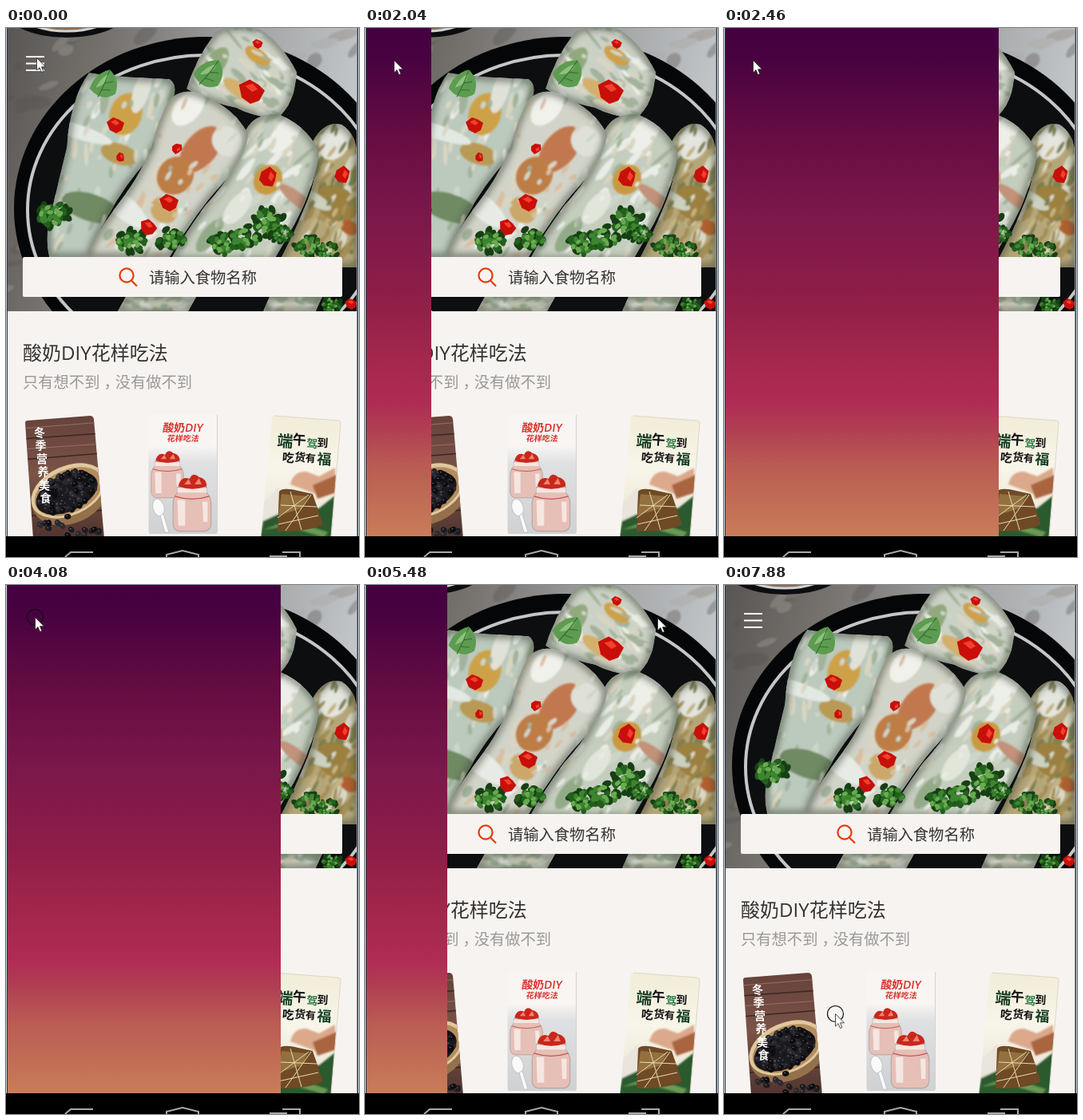
Recreate the animation shown at these times as an HTML page. Size 442 px wide and 663 px high, loop 8 s.

```html
<!DOCTYPE html>
<html lang="zh">
<head>
<meta charset="utf-8">
<style>
html, body { margin: 0; width: 100%; height: 100%; overflow: hidden; background: #f7f3f0; }
svg { display: block; font-family: "Open Sans", "Noto Sans CJK SC", "Noto Sans CJK", sans-serif; }
.brush { font-weight: 600; text-anchor: middle; }
</style>
</head>
<body>
<svg id="stage" width="442" height="663" viewBox="0 0 442 663">
  <defs>
    <linearGradient id="stone" x2="1" y2=".2">
      <stop offset="0" stop-color="#595552"/><stop offset=".3" stop-color="#77736f"/>
      <stop offset=".6" stop-color="#9a9b9c"/><stop offset="1" stop-color="#c3c7ca"/>
    </linearGradient>
    <linearGradient id="dusk" x2="0" y2="1">
      <stop offset="0" stop-color="#450041"/><stop offset=".06" stop-color="#480240"/>
      <stop offset=".2" stop-color="#640c42"/><stop offset=".36" stop-color="#7b174a"/>
      <stop offset=".53" stop-color="#8f1e48"/><stop offset=".64" stop-color="#a2264b"/>
      <stop offset=".74" stop-color="#b02c54"/><stop offset=".79" stop-color="#b03f52"/>
      <stop offset=".86" stop-color="#ba5b53"/><stop offset="1" stop-color="#c87d59"/>
    </linearGradient>
    <linearGradient id="wood" x2="0" y2="1">
      <stop offset="0" stop-color="#64413a"/><stop offset=".5" stop-color="#7b5347"/><stop offset="1" stop-color="#50342e"/>
    </linearGradient>
    <linearGradient id="mist" x2="0" y2="1">
      <stop offset=".27" stop-color="#f8f5f3"/><stop offset=".42" stop-color="#dfe0e1"/><stop offset="1" stop-color="#cfd1d3"/>
    </linearGradient>
    <linearGradient id="cream" x2="0" y2="1">
      <stop offset="0" stop-color="#f1ecd6"/><stop offset=".45" stop-color="#f8f5ea"/><stop offset="1" stop-color="#e6dfcb"/>
    </linearGradient>
    <filter id="soft"><feGaussianBlur stdDeviation="1.3"/></filter>
    <filter id="shade"><feGaussianBlur stdDeviation="4"/></filter>
    <clipPath id="photo"><path d="M2 0H439V355H2Z"/></clipPath>
    <clipPath id="card1"><path d="M24 495Q24 492 27 492L105 486Q109 486 110 490L123 640H34Z"/></clipPath>
    <clipPath id="card3"><path d="M333 489Q333 486 336 486L416 492Q420 493 419 496L407 640H319Z"/></clipPath>
    <g id="mint">
      <path fill="#5d9c50" d="M-15 6Q-12-12 4-19Q18-10 15 7Q2 20-15 6Z"/>
      <path fill="#8fc07f" d="M-8 4Q-4-9 4-14Q5-2-8 4Z"/>
      <path fill="none" stroke="#35702f" d="M4-18Q2-4-4 14M1-3 10-6M-1 5 9 4"/>
    </g>
    <g id="chili">
      <path fill="#c80f0a" d="M-11-4-3-10 5-7 11-3 8 6 1 10-7 6Z"/>
      <path fill="#f2402c" d="M-6-4 0-7 5-3 1 0Z"/>
    </g>
    <g id="jar">
      <path fill="#e6bfb6" stroke="#b3a6a2" d="M-17-24H17V-18Q23-12 22-2V17Q21 23 15 24H-15Q-21 23-22 17V-2Q-23-12-17-18Z"/>
      <path fill="#f5e6e1" d="M-17-10H-8V18H-16ZM12-8H18V14H13ZM-17-23H17V-18H-17Z"/>
      <path fill="none" stroke="#c5534f" d="M-20-14Q0-8 20-14"/>
      <path fill="#c9271c" d="M-16-25Q-13-37-3-33Q1-41 8-35Q17-33 17-25Q0-19-16-25Z"/>
      <path fill="#f0836f" d="M-9-27-4-33-1-27ZM3-27 8-34 11-27Z"/>
    </g>
  </defs>

  <g id="hero" clip-path="url(#photo)">
    <path fill="url(#stone)" d="M0 0H442V355H0Z"/>
    <g id="speckle" filter="url(#soft)" opacity=".35"></g>
    <ellipse cx="76" cy="-28" rx="82" ry="40" fill="#0d0d10"/>
    <ellipse cx="76" cy="-30" rx="68" ry="34" fill="#8d6a4e" stroke="#cfd2d2" stroke-width="3"/>
    <ellipse cx="250" cy="226" rx="240" ry="215" fill="#050608"/>
    <ellipse cx="250" cy="228" rx="223" ry="194" fill="#0d0e10" stroke="#c4c7c6" stroke-width="4"/>
    <g id="rolls"></g>
    <g id="garnish"></g>
  </g>

  <rect x="21" y="287" width="400" height="50" rx="2" fill="#f7f3f0"/>
  <g fill="none" stroke="#e8380d" stroke-width="2.2"><circle cx="151" cy="310" r="8.6"/><path d="M157 316.500 164 323.500"/></g>
  <text x="179" y="320" font-size="19.3" fill="#333">请输入食物名称</text>
  <path stroke="#fff" stroke-width="2" d="M25 36H48M25 44.500H48M25 53H48"/>
  <text x="21" y="415.500" font-size="24" fill="#333">酸奶DIY花样吃法</text>
  <text x="21" y="450.500" dx="0 0 0 0 0 5 -5" font-size="19.3" fill="#999">只有想不到，没有做不到</text>

  <g clip-path="url(#card1)">
    <path fill="url(#wood)" d="M20 480H126V640H20Z"/>
    <path stroke="#3a2722" stroke-width="1.500" d="M20 515 120 508M20 541 120 533M20 612 126 604"/>
    <path stroke="#967062" d="M20 502 120 494M20 528 120 521"/>
    <g transform="rotate(-24 78 580)">
      <ellipse cx="78" cy="585" rx="50" ry="36" fill="#94714b"/>
      <ellipse cx="78" cy="580" rx="49" ry="31" fill="#e0c8a0"/>
      <ellipse cx="78" cy="581" rx="45" ry="27" fill="#b48d5e"/>
      <ellipse cx="75" cy="582" rx="41" ry="23" fill="#1b181b"/>
    </g>
    <g id="beans"></g>
  </g>
  <g id="winter" class="brush" fill="#fff" font-size="14"></g>

  <rect x="178.500" y="484" width="86.500" height="149" rx="2" fill="url(#mist)"/>
  <path fill="none" stroke="#d5d1cd" d="M264.500 485V632M179 633.500H264"/>
  <g class="brush" fill="#d8302a" transform="translate(221 506) skewX(-8)">
    <text font-size="14">酸奶DIY</text>
    <text x="2" y="12" font-size="10">花样吃法</text>
  </g>
  <use href="#jar" transform="translate(202 566) scale(.92 .95)"/>
  <use href="#jar" transform="translate(233 603) scale(1.08 1.15)"/>
  <g fill="#fafafa" stroke="#c4c4c6"><ellipse cx="191" cy="601" rx="7" ry="11" transform="rotate(-15 191 601)"/><path d="M193 611 199 632H204L197 609Z"/></g>

  <g clip-path="url(#card3)">
    <path fill="url(#cream)" d="M315 480H422V640H315Z"/>
    <g filter="url(#soft)">
      <path fill="#dca98c" d="M356 572Q360 555 376 556L392 562 412 551V580L388 584Z"/>
      <path fill="#a9653f" d="M384 573 414 560V582L390 590Z"/>
      <path fill="#e9e4dc" d="M322 596 342 575 350 610 322 625Z"/>
      <path fill="#2c5a2d" d="M318 640 322 618 352 604 392 602 412 586 408 640Z"/>
      <path fill="#6b9a55" d="M322 629 355 617 403 632 398 638 350 624Z"/>
    </g>
    <path fill="#6f4a25" d="M342 581Q346 575 366 580L384 584 397 622Q378 632 340 631 336 624Z"/>
    <path fill="#93703d" d="M345 584 378 587 370 602 341 611Z"/>
    <path fill="none" stroke="#e7dcb5" d="M344 598 389 600M340 614 379 585M356 581 370 629M341 622 391 611M382 585 350 630"/>
  </g>
  <path fill="none" stroke="#ddd6c6" d="M336 486 416 492Q420 493 419 496L407 637"/>
  <g id="festival" class="brush"></g>

  <rect id="drawer" x="2" y="0" width="0" height="637" fill="url(#dusk)"/>
  <path fill="#000" d="M0 637H442V663H0Z"/>
  <path fill="none" stroke="#a9a9a9" stroke-width="2" d="M74 663 81 657H109M201 664V660L221 655 241 660V664M346 657H368V664M330 662H352"/>
  <path fill="#cbd5df" d="M0 0H1V637H0ZM441 0H442V637H441Z"/>
  <path fill="#26343f" d="M1 0H2V637H1ZM439.500 0H441V637H439.500Z"/>

  <g id="cursor">
    <circle id="ring" cx=".5" cy=".5" r="10" fill="none" stroke="#111" stroke-width="1.200"/>
    <path fill="#fff" stroke="#222" stroke-width=".8" d="M.5.5V16L4 12.600 6.500 18.500 8.900 17.500 6.500 11.800H11.500Z"/>
  </g>
</svg>
<script>
const $ = id => document.getElementById(id);
let seed = 7;
const rand = (a, b) => {
  seed = seed * 16807 % 2147483647;
  return a + (b - a) * seed / 2147483647;
};
const pick = list => list[Math.floor(rand(0, list.length))];

function add(parent, tag, attrs, text) {
  const el = document.createElementNS("http://www.w3.org/2000/svg", tag);
  for (const key in attrs) el.setAttribute(key, attrs[key]);
  if (text) el.textContent = text;
  return parent.appendChild(el);
}

function blotch(parent, x, y, rx, ry, angle, fill) {
  add(parent, "ellipse", { cx: x, cy: y, rx, ry, fill, transform: `rotate(${angle} ${x} ${y})` });
}

for (let i = 0; i < 90; i++)
  blotch($("speckle"), rand(0, 440), rand(0, 355), rand(5, 24), rand(3, 9), rand(-50, 0), pick(["#55504d", "#a8a5a2", "#8b7b70"]));

// Rice-paper rolls: outline, box, grain angle, base tone, mottling, filling patches [x, y, rx, ry, colour]
const pale = ["#eaede6", "#cdd5c8", "#a3b39b", "#d9d5c2"];
const rolls = [
  ["M262 6Q285-8 318 2Q345 18 364 55Q362 95 340 113Q310 112 288 100Q250 92 226 76Q238 38 262 6Z", [226, 0, 138, 112], 35, "#ccd1c6", pale,
    [[315, 35, 18, 9, "#cda04a"], [292, 78, 24, 9, "#d4b06c"], [262, 45, 12, 24, "#91a97c"]]],
  ["M104 56Q145 62 205 64Q216 72 208 92Q198 130 178 165Q150 195 128 235Q112 262 104 287H54Q48 262 56 235Q66 190 76 150Q80 90 104 56Z", [52, 55, 160, 232], -72, "#bcc9bd", pale,
    [[150, 108, 27, 20, "#cda146"], [142, 158, 13, 24, "#b99a54"], [106, 225, 17, 38, "#6f8a64"], [90, 130, 9, 45, "#e2e8e2"], [170, 78, 30, 10, "#e0e2d8"]]],
  ["M384 142Q398 116 420 121Q438 132 440 158V300H338Q362 255 378 215Q392 180 384 142Z", [370, 120, 70, 175], -60, "#b5a67a", ["#d9d8c6", "#a48e55", "#c5b383", "#7f8050"],
    [[412, 142, 25, 18, "#e3e5de"], [414, 220, 21, 28, "#9c8040"], [386, 215, 8, 24, "#ccd1bf"], [430, 250, 9, 12, "#b0612f"]]],
  ["M300 128Q312 106 342 108Q385 128 392 160Q385 200 362 245Q345 275 335 292H205Q225 255 250 222Q290 180 300 128Z", [215, 108, 177, 182], -52, "#c4cdbe", pale,
    [[350, 132, 30, 14, "#edefe9"], [328, 190, 20, 17, "#c9993f"], [366, 215, 8, 30, "#c2937a"], [290, 225, 25, 12, "#e1e5da"], [255, 260, 25, 10, "#93aa88"]]],
  ["M206 88Q225 72 250 86Q285 100 303 132Q302 160 270 196Q235 235 205 287H100Q112 258 135 228Q165 190 182 150Q190 115 206 88Z", [100, 80, 202, 207], -50, "#d3d4c9", pale.concat("#d9bfa2"),
    [[244, 152, 34, 20, "#c27850"], [212, 185, 25, 22, "#bd7d45"], [198, 228, 16, 18, "#cba86a"], [228, 100, 26, 16, "#f1f1ec"], [148, 225, 14, 36, "#e8ebe5"], [277, 142, 18, 20, "#dfe1d9"]]],
  ["M150 337H238L228 355H140ZM330 337H396L388 355H322Z", [140, 337, 256, 18], 0, "#c9cdc2", pale, []],
];
rolls.forEach(([d, [x, y, w, h], angle, base, tones, filling], i) => {
  const clip = add($("hero"), "clipPath", { id: "roll" + i });
  add(clip, "path", { d });
  const body = add($("rolls"), "g", { "clip-path": `url(#roll${i})` });
  add(body, "path", { d, fill: base });
  const grain = add(body, "g", { filter: "url(#soft)" });
  const scatter = (n, size) => {
    for (let k = 0; k < n; k++)
      blotch(grain, rand(x, x + w), rand(y, y + h), rand(size, size * 3), rand(2, size), angle + rand(-20, 20), pick(tones));
  };
  scatter(60, 6);
  filling.forEach(([cx, cy, rx, ry, fill]) => blotch(grain, cx, cy, rx, ry, angle, fill));
  scatter(45, 3);
  add(body, "path", { d, fill: "none", stroke: "#3f4a3a", "stroke-width": 9, opacity: .6, filter: "url(#shade)" });
});

// A loose bunch of coriander leaflets, dark below and bright on top
function sprig(x, y, size) {
  ["#173f14", "#235f1d", "#3d8530", "#69ab50"].forEach((fill, layer) => {
    for (let k = 0; k < 13 - layer * 2; k++) {
      const a = rand(0, 6.3), r = size * Math.sqrt(rand(0, 1)) * (1 - layer * .1);
      blotch($("garnish"), x + r * Math.cos(a), y + r * Math.sin(a) * .8, size * .3 - layer * .8, size * .2 - layer * .5, rand(0, 180), fill);
    }
  });
}
[
  [58, 233, 21], [155, 267, 20], [208, 266, 19], [272, 270, 19], [300, 262, 20], [328, 243, 21], [345, 258, 14],
  [378, 274, 17], [402, 280, 14], [408, 347, 14],
].forEach(bunch => sprig(...bunch));

// Kind, x, y, scale, angle
[
  ["mint", 122, 72, 1.1, 10], ["mint", 253, 58, 1.15, 25],
  ["chili", 137, 122, 1, 0], ["chili", 143, 162, .55, 60], ["chili", 307, 80, 1.5, 10], ["chili", 214, 151, .65, 120],
  ["chili", 204, 219, 1.1, 0], ["chili", 178, 250, 1, 20], ["chili", 328, 187, 1.15, 80], ["chili", 421, 184, 1, 80],
  ["chili", 315, 20, .6, 0], ["chili", 432, 346, .7, 0],
].forEach(([kind, x, y, scale, angle]) =>
  add($("garnish"), "use", { href: "#" + kind, transform: `translate(${x} ${y}) rotate(${angle}) scale(${scale})` }));

for (let i = 0; i < 120; i++) {
  const a = rand(0, 6.3), r = Math.sqrt(rand(0, 1)), spilled = i > 102;
  const u = 41 * r * Math.cos(a), v = 23 * r * Math.sin(a);
  const x = spilled ? rand(42, 122) : 76 + u * .91 + v * .41;
  const y = spilled ? rand(612, 636) : 582 - u * .41 + v * .91;
  blotch($("beans"), x, y, 4.2, 3.3, rand(0, 180), pick(["#0e0d11", "#1c1b21", "#2a2931"]));
  blotch($("beans"), x - 1, y - 1, 1, .6, 0, "#74727c");
}

[..."冬季营养美食"].forEach((char, i) =>
  add($("winter"), "text", { x: 42 + i * 1.5, y: 512 + i * 16.4 }, char));
// Character, centre x, baseline, size, colour
[
  ["端", 349, 525, 20, "#163f25"], ["午", 367, 522, 17, "#111"], ["驾", 383, 526, 14, "#2b7a45"], ["到", 396, 525, 14, "#111"],
  ["吃", 353, 544, 15, "#111"], ["货", 368, 543, 14, "#111"], ["有", 381, 544, 13, "#111"], ["福", 398, 547, 18, "#163f25"],
].forEach(([char, x, y, size, fill]) =>
  add($("festival"), "text", { x, y, fill, "font-size": size, transform: `rotate(4 ${x} ${y})` }, char));

// Held keys: [time, ...values]
const pointer = [
  [0, 38, 37], [680, 37, 39], [840, 36, 40], [4610, 293, 63], [4750, 368, 49], [4870, 367, 48], [5020, 366, 41],
  [6400, 371, 86], [6550, 360, 210], [6670, 346, 390], [6790, 402, 560], [6910, 424, 615], [7030, 379, 585],
  [7180, 388, 574], [7600, 130, 528], [7720, 139, 537],
];
const drawerWidth = [[0, 0], [2040, 81], [2160, 302], [2310, 330], [2460, 342], [5480, 101], [5600, 32], [5720, 8], [5840, 0]];
const pressed = [[0, 0], [1730, 1], [2040, 0], [4080, 1], [4200, 0], [7330, 1], [7460, 0], [7880, 1]];
const held = (keys, t) => keys.findLast(key => key[0] <= t).slice(1);

function frame() {
  const t = performance.now() % 8000;
  $("cursor").setAttribute("transform", `translate(${held(pointer, t)})`);
  $("drawer").setAttribute("width", held(drawerWidth, t)[0]);
  $("ring").setAttribute("opacity", held(pressed, t)[0]);
  requestAnimationFrame(frame);
}
frame();
</script>
</body>
</html>
```
